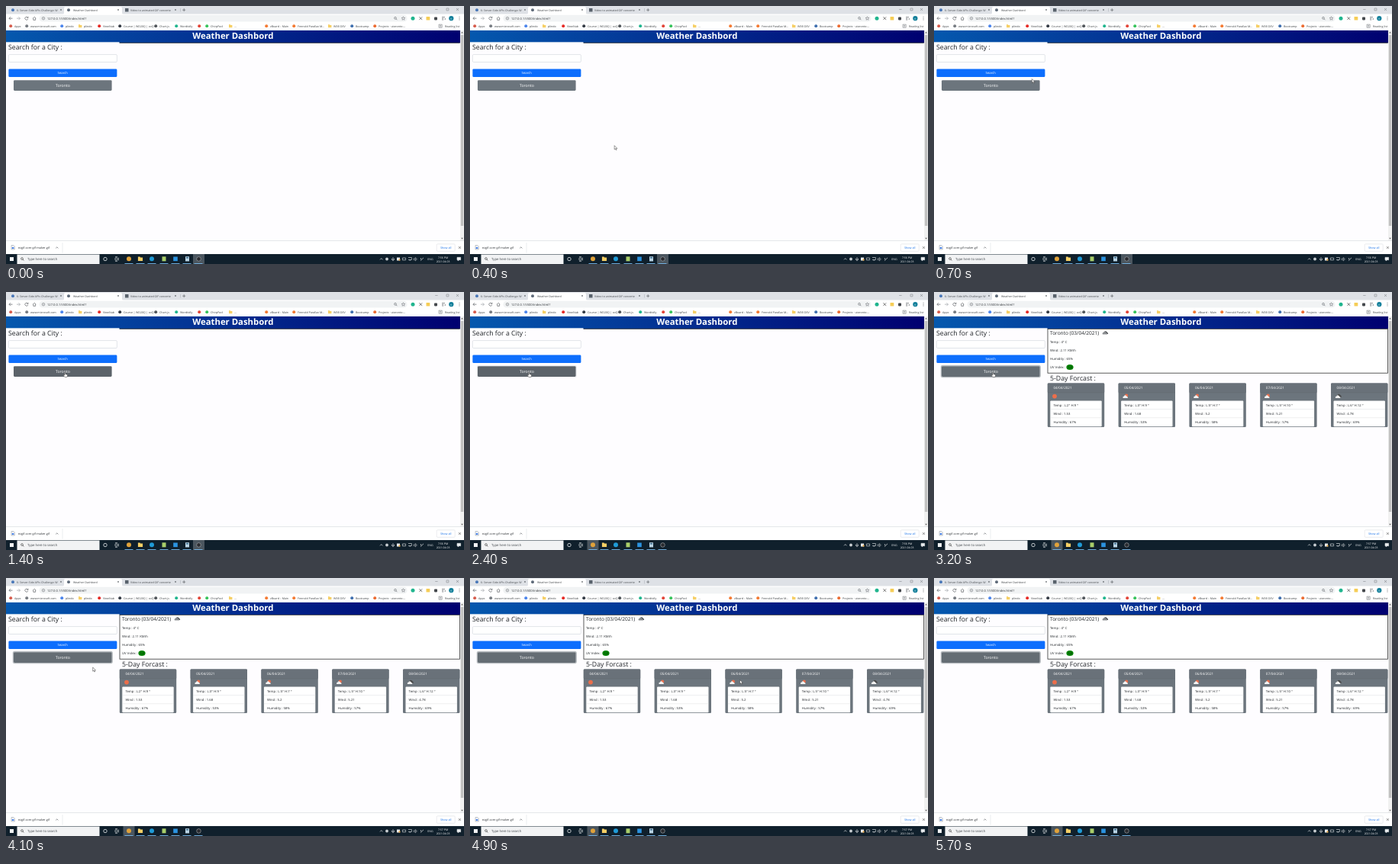
These frames come from a looping animation (600 by 338 pixels, 6700 ms). An HTML page:

```html
<!DOCTYPE html>
<html lang="en">
<head>
<meta charset="utf-8">
<title>Weather Dashbord</title>
<style>
  html, body { margin: 0; width: 100%; height: 100%; overflow: hidden; background: #fff; }
  svg { display: block; width: 600px; height: 338px; }
  text { font-family: "Open Sans", "Noto Sans", sans-serif; text-rendering: geometricPrecision; white-space: pre; }
</style>
</head>
<body>
<svg id="stage" viewBox="0 0 600 338" xmlns="http://www.w3.org/2000/svg"></svg>
<script>
const LOOP = 6700;
const INK = '#212529', GREY = '#6c757d', DIM = '#5f6368', PALE = '#e8ebed';

const rect = (x, y, w, h, fill, extra = '') =>
  `<rect x="${x}" y="${y}" width="${w}" height="${h}" fill="${fill}" ${extra}/>`;
const dot = (x, y, r, fill, extra = '') => `<circle cx="${x}" cy="${y}" r="${r}" fill="${fill}" ${extra}/>`;
const line = (d, color = DIM, width = .7, fill = 'none') =>
  `<path d="${d}" fill="${fill}" stroke="${color}" stroke-width="${width}"/>`;
const text = (x, y, size, str, fill = INK, extra = '') =>
  `<text x="${x}" y="${y}" font-size="${size}" fill="${fill}" ${extra}>${str}</text>`;
const cross = (x, y, r, color = DIM) =>
  line(`M${x - r} ${y - r}l${2 * r} ${2 * r}m0 ${-2 * r}l${-2 * r} ${2 * r}`, color, .6);
const folder = (x, y, s = 1) =>
  `<path transform="translate(${x} ${y}) scale(${s})" d="M-2.2-2h1.8l.6.7h2v3.3h-4.4z" fill="#f6cf65"/>`;
const lens = (x, y, color = DIM) =>
  dot(x, y, 1.4, 'none', `stroke="${color}" stroke-width=".6"`) + line(`M${x + 1} ${y + 1}l1.4 1.4`, color, .7);
const MIDDLE = 'text-anchor="middle"', MEDIUM = 'font-weight="500"';

function tabStrip() {
  const favicon = (x, color) => dot(x, 5.2, 2, color);
  const control = '#75797e';
  return rect(0, 0, 600, 11, '#dee1e6') +
    `<path d="M74 11q2 0 2-2V3q0-2 2-2h72q2 0 2 2v6q0 2 2 2z" fill="#fff"/>` +
    favicon(9, '#4a78b8') + text(14, 6.7, 3.6, '6: Server-Side APIs Challenge: W', '#45494d') + cross(72, 5, 1) +
    favicon(82, '#5f6b7a') + text(88, 6.7, 3.6, 'Weather Dashbord', '#3c4043') + cross(147, 5, 1) +
    rect(156, 3, 4.5, 4.5, '#59626c') + text(163, 6.7, 3.6, 'Video to animated GIF converte', '#45494d') + cross(222, 5, 1) +
    line('M228.5 3v4.5', '#9aa0a6', .4) + line('M231.2 5.2h4M233.2 3.2v4') +
    line('M562.2 4.5h3.4', control, .5) + line('M577 3h2.9v2.9h-2.9z', control, .5) + cross(591.5, 4.5, 1.4, control);
}

function toolbar() {
  return rect(0, 10.5, 600, 21.5, '#fff') +
    line('M8.5 16.2h-4.5m2-2l-2 2l2 2') + line('M14 16.2h4.5m-2-2l2 2l-2 2', '#a0a4a8') +
    line('M28.6 15.2a2 2 0 1 0 .2 1.6m.2-3v1.7h-1.7') + line('M35.2 16.2l2-2l2 2m-3.4-.3v2.5h2.8v-2.5') +
    rect(43.5, 11.8, 482, 8.8, '#f1f3f4', 'rx="4.4"') +
    dot(49, 16.2, 1.8, 'none', `stroke="${DIM}" stroke-width=".5"`) + line('M49 15.9v1.3m0-2.1v.4', DIM, .5) +
    text(54, 17.8, 4.08, '127.0.0.1:5500/index.html?', '#303438') +
    lens(510, 15.8) + line('M520.5 13.8l.7 1.6l1.7.1l-1.3 1.1l.4 1.7l-1.5-.9l-1.5.9l.4-1.7l-1.3-1.1l1.7-.1z', DIM, .5) +
    dot(533, 16.2, 2.5, '#20b58e') + cross(543.3, 16.2, 1.9, '#222') +
    rect(550.5, 14, 4.8, 4.6, '#f5cd56', 'rx=".6"') + rect(561, 14.6, 4, 3.8, '#44484c', 'rx=".8"') +
    line('M571 14.6h4m-4 1.7h2.3m-2.3 1.7h2.3m2-2v2', DIM) +
    dot(583.3, 16.2, 3.1, '#15809b') + text(583.3, 17.5, 3.4, 'n', '#fff', MIDDLE) +
    [14.3, 16.2, 18.1].map(y => dot(594, y, .5, DIM)).join('');
}

function bookmarks() {
  const items = [
    [11, 'Apps', '#d65c4c'], [32, 'www.microsoft.com', '#777c82'], [78, 'plindo', '#4a84ec'],
    [102, 'plindo', 0], [127, 'ViewNub', '#e62a25'], [154, 'Course | WD20Q | ovQ', '#333a44'],
    [201, 'Chart.js', '#50555a'], [228, 'Wordtidly', '#1fb58d'], [258, '', '#e24437'],
    [268, 'ChirpPad', '#35c35a'], [299, '...', 0], [346, 'zBoard – Main', '#f47a32'],
    [382, 'Fennold Parallax M…', '#f47a32'], [429, 'W3B DEV', 0], [458, 'Bootcamp', '#3f6fae'],
    [488, 'Projects · utoronto-…', '#ec6b31']
  ];
  return items.map(([x, label, color]) =>
    (color ? dot(x - 4.8, 26.2, 2, color) : folder(x - 4.8, 26.2)) +
    text(x, 27.7, 3.65, label, '#3c4043')).join('') +
    line('M567 24.2h4.2v4h-4.2zm1 1.4h2.2m-2.2 1.3h2.2', DIM, .5) + text(575, 27.7, 3.6, 'Reading list', '#3c4043');
}

function page() {
  return rect(0, 32, 595, 16.2, 'url(#band)') +
    text(297.3, 43.1, 11.35, 'Weather Dashbord', '#fff', MIDDLE + ' font-weight="700"') +
    rect(0, 47.3, 148.5, 1.5, '#fff') +
    text(3, 57, 8.75, 'Search for a City :', INK, MEDIUM) +
    rect(3.4, 63.6, 142, 9.9, '#fff', 'rx="1.3" stroke="#ced4da" stroke-width=".6"') +
    rect(3.4, 82.4, 142, 10.6, '#0d6efd', 'rx="1.3"') +
    text(74.3, 89.2, 4.25, 'Search', '#fff', MIDDLE) +
    rect(595, 32, 5, 275.5, '#f1f1f1') + rect(595.8, 38, 3.5, 250, '#c1c1c1') +
    `<path d="M596.2 35.6h2.6l-1.3-1.8zM596.2 303.8h2.6l-1.3 1.8z" fill="#555"/>`;
}

function downloads() {
  return rect(0, 307.5, 600, 18, '#fff') + rect(0, 307.3, 600, .6, '#d5d8dc') +
    line('M7 313.5h3l1.3 1.3v4.2h-4.3z', '#8d959e', .5, '#eef1f4') + rect(7.8, 316, 2.5, 2, '#4a84ec') +
    text(16, 318.1, 3.9, 'ezgif.com-gif-maker.gif', '#303438') + line('M65.2 317.4l1.6-1.6l1.6 1.6') +
    line('M74 310v13.5', '#d5d8dc', .5) +
    rect(564.2, 311.8, 24, 9.5, '#fff', 'rx="1.2" stroke="#d5d8dc" stroke-width=".5"') +
    text(576.2, 318, 3.8, 'Show all', '#1a73e8', MIDDLE) + cross(594.4, 316.5, 1.4, '#444');
}

function taskbar() {
  const running = [161, 176, 191, 207, 222, 237, 252].map(x => rect(x - 5.5, 337.1, 11, .9, '#76b9ed')).join('');
  const tray = line('M490 332.3l1.7-1.7l1.7 1.7', PALE) + dot(499, 331.5, 1.9, '#c9ced2') +
    line('M507 329.3v3m-1.5-1.4v1.4q1.5 1.4 3 0v-1.4m-1.5 2.2v1', PALE, .7) +
    rect(512, 329.5, 4, 4, PALE) + rect(514.5, 331.5, 2, 2, '#e9a53a') +
    line('M519.4 330h4.2v2.8h-4.2z', PALE, .6) + line('M527 329.5h4.4v3h-4.4m2.2 0v1.5', PALE, .6) +
    line('M534.2 330.8h1.1l1.3-1.2v4.2l-1.3-1.2h-1.1zm3.4-.5q1 1.3 0 2.6', PALE, .5) +
    line('M543 333.6l4-3.8m-3.2 2q-1.6-1 .2-1.4', PALE, .7);
  return rect(0, 325, 600, 13, '#10202c') +
    rect(5, 329, 5, 5, '#f4f6f7') + rect(14.5, 325.5, 108, 12.5, '#f2f3f4') + lens(21, 331, '#333') +
    text(28, 333.1, 4.3, 'Type here to search', '#41474c') +
    dot(130, 331.5, 2.2, 'none', `stroke="${PALE}" stroke-width=".8"`) +
    line('M143 330h3v3h-3zm4.4-.4v3.8m-4.4-4.8h3m-3 5.8h3', PALE, .6) +
    '<rect id="focusApp" y="325" width="15" height="13" fill="#4b565f"/>' + running +
    dot(161, 331.3, 3, '#e0a23a') + folder(176, 331.3, 1.4) + dot(191, 331.3, 3, '#1f9bd7') +
    rect(204.5, 328.3, 5, 6, '#a9cf6a') + rect(219.2, 328.5, 5.6, 5.6, '#2b93e0') +
    rect(235, 328.2, 5, 6.2, '#b9d4e4') + rect(236, 329.1, 3, 1.4, '#35668a') +
    dot(252.5, 331.4, 2.8, '#292b30', 'stroke="#c4c8cb" stroke-width=".5"') +
    tray + text(556, 333, 3.7, 'ENG', PALE, MIDDLE) +
    `<text id="clock" x="572.5" y="330.7" font-size="3.5" fill="#fff" ${MIDDLE}></text>` +
    text(572.5, 336, 3.4, '2021-04-03', '#fff', MIDDLE) +
    line('M591 329.3h4.6v3.4h-2.2l-1.2 1.2v-1.2h-1.2z', PALE, .6, PALE);
}

const cloud = (x, y, fill) =>
  `<path d="M${x - 3} ${y + 1.8}q-1.2-2 .9-2.3q.6-2.2 2.4-1.3q1.5.2 1.5 1.5q2 .3 1.2 2.1z" fill="${fill}"/>`;

function weatherIcon(x, y, kind) {
  if (kind === 'sun') return dot(x, y, 2.9, '#eb6e4b');
  if (kind === 'dark') return cloud(x + 1.5, y - .8, '#484848') + cloud(x, y + .7, '#f2f2f2');
  return dot(x + 1.3, y - .9, 2.1, '#eb6e4b') + cloud(x, y + .7, '#f2f2f2');
}

function forecast() {
  const days = [
    [2, 9, '1.53', 67, 'sun'], [3, 9, '1.68', 53], [5, 7, '5.2', 58], [5, 10, '5.21', 57], [6, 12, '4.78', 69, 'dark']
  ];
  const card = ([low, high, wind, humidity, kind], i) => {
    const x = 148.8 + 92.8 * i;
    const rows = [`Temp : L:${low}° H:${high} °`, `Wind : ${wind}`, `Humidity : ${humidity}%`];
    return rect(x, 119.4, 74.4, 57.6, GREY, 'rx="1.3"') +
      rect(x, 119.6, 74.4, 12.2, '#697179', 'rx="1.2"') + rect(x, 131.7, 74.4, .4, '#5d656c') +
      text(x + 7.6, 127, 4.55, `0${i + 4}/04/2021`, '#fff') + weatherIcon(x + 9.2, 136.6, kind) +
      rect(x + 3.5, 142.4, 67.4, 33.9, '#fff', 'rx="1"') +
      rows.map((row, j) => text(x + 7.6, 149.8 + 11.2 * j, 4.25, row) +
        (j ? rect(x + 3.5, 142.3 + 11.2 * j, 67.4, .4, '#d4d6d8') : '')).join('');
  };
  const now = ['Temp : 4° C', 'Wind : 2.11 KM/h', 'Humidity : 65%', 'UV Index :'];
  return rect(149, 48.5, 445.6, 57.7, '#fff', 'stroke="#333" stroke-width=".8"') +
    text(152, 55.6, 6.55, 'Toronto (03/04/2021)', INK, MEDIUM) +
    cloud(225, 53.2, '#45484c') + cloud(224, 53.8, '#8a8d90') +
    now.map((row, i) => text(152, 66.7 + 11.1 * i, 4.28, row)).join('') +
    `<ellipse cx="178" cy="98.4" rx="4.6" ry="3.5" fill="#008000"/>` + text(178, 99.9, 4, '1.4', '#123012', MIDDLE) +
    text(152, 115.5, 8.75, '5-Day Forcast :', INK, MEDIUM) + days.map(card).join('');
}

const stage = document.getElementById('stage');
stage.innerHTML = `<defs><linearGradient id="band">
    <stop offset="0" stop-color="#0558ae"/><stop offset="1" stop-color="#000070"/>
  </linearGradient></defs>` + rect(0, 0, 600, 338, '#fefdff') +
  page() + rect(148.6, 47.8, 446, .9, '#20242c', 'id="emptyBox"') + `<g id="results">${forecast()}</g>` +
  rect(9.4, 96.5, 129.8, 15, 'none', 'id="ring" rx="2" stroke="#b9bdc1" stroke-width="1.4"') +
  rect(10, 97.2, 128.6, 13.7, GREY, 'id="city" rx="1.3"') + text(74.4, 106, 5.2, 'Toronto', '#fff', MIDDLE) +
  tabStrip() + toolbar() + bookmarks() + downloads() + taskbar() +
  `<path id="arrow" d="M0 0v5.2l1.2-1.1l.9 1.9l.9-.4l-.9-1.8h1.7z" fill="#fff" stroke="#222" stroke-width=".45"/>
   <path id="hand" d="M-.6 0q.6-.6 1.1 0v2l2.3.6q.6.2.5 1l-.5 2.2h-3.2l-1.9-2.5q.4-.8 1.7.2z" fill="#fff" stroke="#222" stroke-width=".45"/>`;

const $ = id => document.getElementById(id);
const [arrow, hand, city, ring, results, emptyBox, focusApp, clock] =
  ['arrow', 'hand', 'city', 'ring', 'results', 'emptyBox', 'focusApp', 'clock'].map($);
const show = (el, on) => el.setAttribute('opacity', +on);

// Pointer stops: time, x, y
const stops = [
  [100, 250, 270], [700, 128.3, 95.5], [800, 128.3, 95.5], [1400, 77.3, 105.6], [3200, 77.3, 105.6], [3800, 90, 104],
  [4100, 113.7, 117], [4500, 147, 118], [4800, 300, 112], [5200, 514, 198], [5400, 586, 203], [5600, 299, 142]
];

function pointerAt(t) {
  const next = Math.max(1, stops.findIndex(stop => stop[0] >= t));
  const [t0, x0, y0] = stops[next - 1], [t1, x1, y1] = stops[next];
  const k = (t - t0) / (t1 - t0);
  return [x0 + (x1 - x0) * k, y0 + (y1 - y0) * k];
}

function draw(time) {
  const t = Math.floor(time % LOOP / 100) * 100;
  const visible = t >= 100 && t <= 5600;
  const [x, y] = visible ? pointerAt(t) : [0, 0];
  const inside = (left, top, right, bottom) => visible && x > left && x < right && y > top && y < bottom;
  const onCity = inside(10, 97, 138.6, 111);
  const pointing = onCity || inside(3, 82, 145.6, 93);
  arrow.setAttribute('transform', `translate(${x} ${y})`);
  hand.setAttribute('transform', `translate(${x} ${y})`);
  show(arrow, visible && !pointing);
  show(hand, pointing);

  const focused = t >= 2400, loaded = t >= 3200;
  city.setAttribute('fill', loaded ? '#656d74' : onCity || focused ? '#5c636a' : GREY);
  ring.setAttribute('opacity', Math.min(1, Math.max(0, (t - 2300) / 400)));
  show(results, loaded);
  show(emptyBox, !loaded);
  focusApp.setAttribute('x', focused ? 153.5 : 245);
  clock.textContent = t < 2900 ? '7:56 PM' : '7:57 PM';
}

const start = performance.now();
function tick() {
  draw(performance.now() - start);
  requestAnimationFrame(tick);
}
tick();
</script>
</body>
</html>
```
